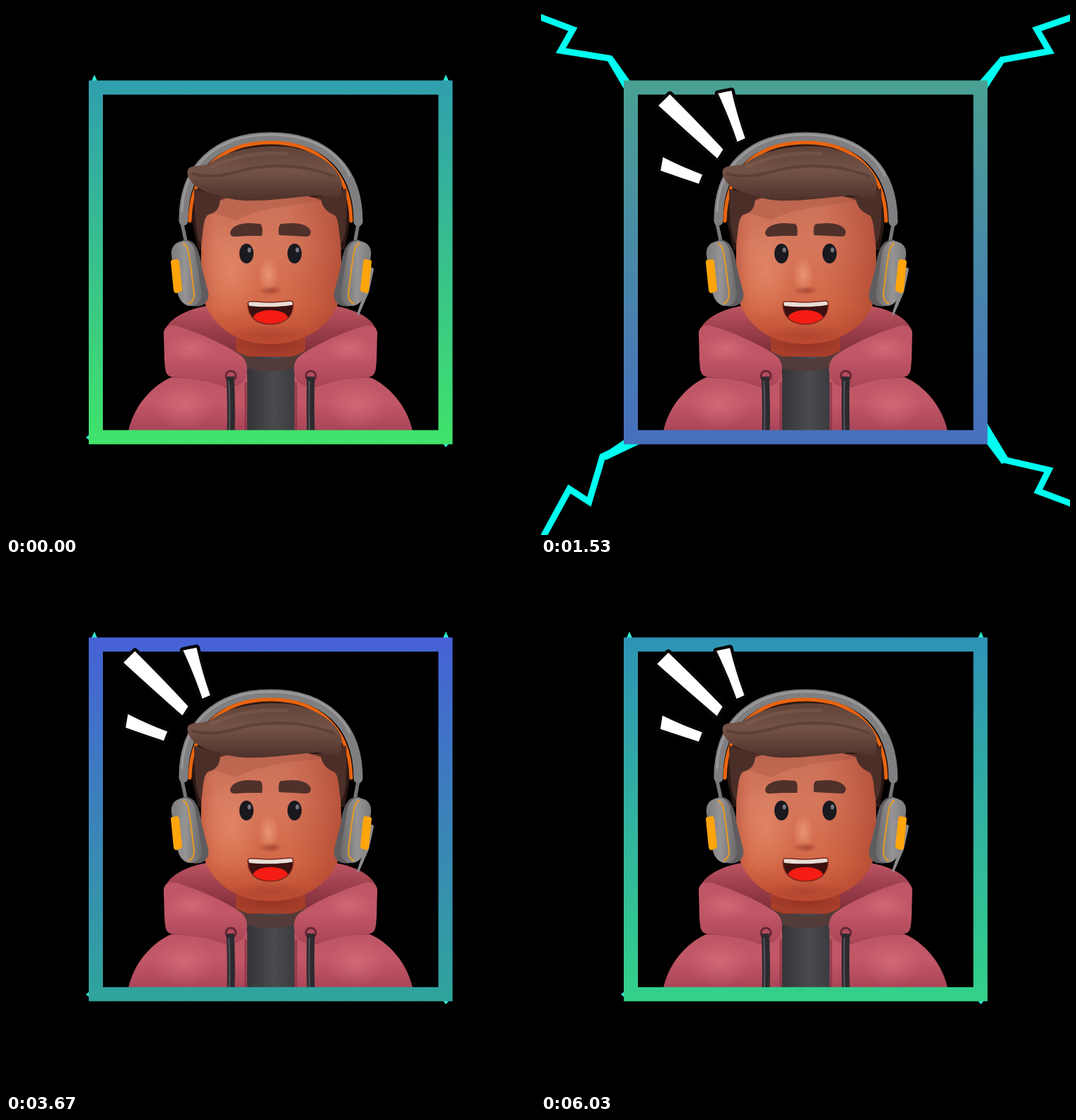
An HTML page that plays this animation: 748 px wide and 748 px high, repeating every 6.06 s.

```html
<!DOCTYPE html>
<html lang="en">
<head>
<meta charset="utf-8">
<title>Headphones portrait</title>
<style>
html, body { margin: 0; width: 100%; height: 100%; overflow: hidden; background: #000; }
svg { display: block; width: 100vw; height: 100vh; }
</style>
</head>
<body>
<svg viewBox="0 0 748 748">
  <defs>
    <linearGradient id="edge" gradientUnits="userSpaceOnUse" x1="0" y1="106" x2="0" y2="620">
      <stop id="top"/><stop id="bottom" offset="1"/>
    </linearGradient>
    <linearGradient id="skin" x2="0" y2="1">
      <stop stop-color="#c97058"/><stop offset=".35" stop-color="#d5775b"/>
      <stop offset=".75" stop-color="#d36847"/><stop offset="1" stop-color="#bd4a30"/>
    </linearGradient>
    <linearGradient id="side">
      <stop stop-color="#a5402b" stop-opacity=".35"/><stop offset=".1" stop-color="#b84a30" stop-opacity="0"/>
      <stop offset=".6" stop-color="#b84a30" stop-opacity="0"/><stop offset="1" stop-color="#a03a26" stop-opacity=".6"/>
    </linearGradient>
    <linearGradient id="hair" x2="0" y2="1">
      <stop stop-color="#5f4238"/><stop offset=".45" stop-color="#745347"/><stop offset="1" stop-color="#4d3129"/>
    </linearGradient>
    <linearGradient id="cloth" x2="0" y2="1">
      <stop stop-color="#bd5665"/><stop offset=".5" stop-color="#c25767"/><stop offset="1" stop-color="#a94558"/>
    </linearGradient>
    <linearGradient id="inside" x2="0" y2="1">
      <stop stop-color="#bd5663"/><stop offset=".4" stop-color="#9c3e4b"/><stop offset="1" stop-color="#6d2632"/>
    </linearGradient>
    <linearGradient id="shirt">
      <stop stop-color="#2c2c30"/><stop offset=".55" stop-color="#4b4b4f"/><stop offset="1" stop-color="#333337"/>
    </linearGradient>
    <linearGradient id="metal">
      <stop stop-color="#7d7a7b"/><stop offset=".45" stop-color="#979496"/><stop offset="1" stop-color="#6b686a"/>
    </linearGradient>
    <radialGradient id="glow">
      <stop stop-color="#f0a07c" stop-opacity=".75"/><stop offset="1" stop-color="#f0a07c" stop-opacity="0"/>
    </radialGradient>
    <radialGradient id="shade">
      <stop stop-color="#8c2f24" stop-opacity=".7"/><stop offset="1" stop-color="#8c2f24" stop-opacity="0"/>
    </radialGradient>
    <radialGradient id="pink">
      <stop stop-color="#da7380" stop-opacity=".6"/><stop offset="1" stop-color="#da7380" stop-opacity="0"/>
    </radialGradient>
    <path id="face" d="M277 300C278 252 471 252 472 300L475 392C474 444 430 478 374 478C318 478 279 444 275 392Z"/>
    <path id="lips" d="M342 421C343 415 350 419 374 419C398 419 405 414 406 420C407 440 393 450 374 450C354 450 342 440 342 421Z"/>
    <clipPath id="mouth"><use href="#lips"/></clipPath>
  </defs>

  <g id="bolts" fill="none" stroke="#00fff0" stroke-miterlimit="8">
    <path pathLength="100" d="M131 132L97 74L28 63L45 33L-8 13"/>
    <path pathLength="100" d="M616 130L652 76L719 64L701 33L756 14"/>
    <path pathLength="100" d="M616 582L656 642L718 656L703 686L756 706"/>
    <path pathLength="100" d="M148 608L87 637L68 701L40 683L0 756"/>
  </g>
  <path id="roots" fill="#00fff0" d="M93 70L101 71L141 127L134 142ZM648 74L657 76L614 143L603 126ZM660 638L652 648L607 588L620 572ZM84 636L92 642L159 610L146 594Z"/>
  <path id="tips" fill="#2ce9d5" d="M120 108L125 97L130 108ZM617 108L622 97L627 108ZM617 618L622 624L627 618ZM119 605L113 610L119 615Z"/>
  <rect id="back" x="136" y="125" width="476" height="476"/>

  <g id="person">
    <!-- hood lining, neck and shirt -->
    <path fill="url(#inside)" d="M223 465C225 444 254 428 290 423H458C496 428 523 443 525 465L430 510H322Z"/>
    <path fill="#a63e2a" d="M325 455H423V495C400 506 348 506 325 495Z"/>
    <ellipse cx="374" cy="478" rx="52" ry="14" fill="url(#shade)"/>
    <path fill="url(#shirt)" d="M326 496H424L412 602H335Z"/>
    <path fill="#533b39" d="M322 486C345 504 402 504 425 486L421 502C405 521 345 521 328 503Z"/>

    <!-- jacket -->
    <path fill="url(#cloth)" d="M173 601C182 560 214 530 242 522L300 526L341 520V601Z"/>
    <path fill="url(#cloth)" d="M575 601C566 560 534 530 506 522L448 526L408 520V601Z"/>
    <ellipse cx="252" cy="565" rx="44" ry="34" fill="url(#pink)"/>
    <ellipse cx="496" cy="565" rx="44" ry="34" fill="url(#pink)"/>
    <g fill="none" stroke="#7d3040" stroke-opacity=".65" stroke-width="3">
      <path d="M234 524C265 524 292 530 312 538M514 524C484 524 456 530 437 538M339 532V600M410 532V600"/>
    </g>
    <path fill="url(#cloth)" d="M223 462C224 452 234 449 246 454C275 463 313 480 333 495C344 504 343 524 333 533C322 542 306 538 292 533C270 526 250 526 233 524C224 522 225 510 224 500Z"/>
    <path fill="url(#cloth)" d="M525 462C524 452 514 449 502 454C473 463 435 480 415 495C404 504 405 524 415 533C426 542 442 538 456 533C478 526 498 526 515 524C524 522 523 510 524 500Z"/>
    <ellipse cx="262" cy="484" rx="36" ry="20" fill="url(#pink)"/>
    <ellipse cx="486" cy="484" rx="36" ry="20" fill="url(#pink)"/>
    <g fill="none" stroke="#662735" stroke-width="3"><circle cx="318" cy="523" r="7"/><circle cx="431" cy="523" r="7"/></g>
    <g fill="none">
      <path stroke="#2b2a2e" stroke-width="11" d="M317 524Q319 560 318 601M431 524Q430 560 431 601"/>
      <path stroke="#55535a" stroke-width="2" d="M315 530Q317 560 316 601M429 530Q428 560 429 601"/>
    </g>

    <!-- headband, behind the fringe -->
    <path fill="#2b1814" d="M262 300C262 230 305 193 374 193C445 193 486 235 487 300L479 345H272Z"/>
    <g fill="none" stroke-linecap="round">
      <path stroke="#777679" stroke-width="5" d="M249 308L255 336M498 308L493 336"/>
      <path stroke="#7f7e80" stroke-width="13" d="M251 304C250 230 296 185 374 185C452 185 498 230 498 305"/>
      <path stroke="#9b999b" stroke-width="3" d="M249 290C251 226 298 182 374 182C430 182 468 204 486 240"/>
      <path stroke="#e9640f" stroke-width="5" d="M260 304C261 238 300 193 374 193C446 193 487 238 488 304"/>
    </g>

    <!-- head -->
    <use href="#face" fill="url(#skin)"/>
    <use href="#face" fill="url(#side)"/>
    <path fill="#a95543" opacity=".4" d="M300 270H447L450 276C400 281 350 288 326 303L290 292Z"/>
    <ellipse cx="318" cy="375" rx="40" ry="70" fill="url(#glow)" opacity=".55"/>
    <ellipse cx="374" cy="464" rx="60" ry="14" fill="url(#shade)" opacity=".5"/>
    <path fill="#4b2e28" d="M266 258L303 270C303 285 298 292 286 295C278 300 279 322 276 336C268 330 266 285 266 258Z"/>
    <path fill="#4b2e28" d="M481 258L445 270C446 286 456 292 465 296C472 304 470 324 474 336C483 325 482 285 481 258Z"/>
    <path fill="url(#hair)" d="M258 230C262 225 276 227 288 223C315 203 358 196 398 199C445 205 474 232 475 252C475 266 472 274 464 272C454 271 448 268 438 268C402 271 356 278 325 274C296 269 270 261 262 248C257 243 255 235 258 230Z"/>
    <path fill="none" stroke="#46302a" stroke-opacity=".45" stroke-width="4" d="M262 237C294 246 317 236 344 230C383 223 424 225 465 241"/>
    <path fill="none" stroke="#8a6857" stroke-opacity=".35" stroke-width="5" d="M290 228C325 211 360 206 398 209"/>

    <!-- features -->
    <g fill="#4f302b">
      <path d="M317 320C319 312 330 307 344 307L359 308Q364 310 362 325L342 325L323 326Q317 326 317 320Z"/>
      <path d="M431 319C429 311 418 307 404 307L389 308Q384 310 386 324L406 325L425 326Q431 326 431 319Z"/>
    </g>
    <g fill="#19191f"><ellipse cx="340" cy="350" rx="10" ry="14"/><ellipse cx="408" cy="350" rx="10" ry="14"/></g>
    <g fill="#777782"><ellipse cx="344" cy="345" rx="2.5" ry="3.5"/><ellipse cx="412" cy="345" rx="2.5" ry="3.5"/></g>
    <ellipse cx="374" cy="402" rx="17" ry="7" fill="url(#shade)"/>
    <ellipse cx="371" cy="380" rx="15" ry="26" fill="url(#glow)"/>
    <g clip-path="url(#mouth)">
      <path fill="#3b100f" d="M335 410H412V455H335Z"/>
      <ellipse cx="374" cy="442" rx="25" ry="12" fill="#f51c13"/>
      <path fill="#e8ded6" d="M340 412H408V422C390 426 360 426 344 424Z"/>
    </g>
    <use href="#lips" fill="none" stroke="#7b291f" stroke-width="1.5"/>

    <!-- ear cups -->
    <path fill="#8c8a8c" d="M514 372Q519 367 520 373L513 405L499 437L496 436L508 400Z"/>
    <g id="cup">
      <path fill="#5f5c5f" d="M250 331C267 329 273 343 277 370L286 405C288 420 277 427 262 424Z"/>
      <path fill="url(#metal)" d="M240 336C252 328 264 333 267 346L277 406C277 418 270 425 259 424C247 422 243 410 240 396L234 353C233 346 235 340 240 336Z"/>
      <path fill="none" stroke="#e99a1c" stroke-width="2" d="M250 336C259 339 258 352 261 367L266 407Q266 418 258 421"/>
      <path fill="#ffa50c" d="M233 362Q233 359 236 359L242 358Q244 358 245 362L249 400Q249 404 246 404L241 406Q238 406 237 402Z"/>
    </g>
    <use href="#cup" transform="matrix(-1 0 0 1 750 0)"/>
  </g>

  <rect id="frame" x="127" y="115.3" width="494.4" height="494.4" fill="none" stroke="url(#edge)" stroke-width="20"/>

  <g id="rays" fill="#fff" stroke="#050505" stroke-width="9" stroke-linejoin="round" paint-order="stroke">
    <path d="M165 142L181 126Q222 166 257 203L249 216Q205 178 165 142Z"/>
    <path d="M249 124L268 120Q276 154 288 187L277 192Q265 157 249 124Z"/>
    <path d="M172 215Q200 229 228 239L223 252Q195 243 169 234Z"/>
  </g>
</svg>
<script>
const LOOP = 6060, BEAT = 1200, TAU = Math.PI * 2;
const $ = id => document.getElementById(id);
// time, then top and bottom colours of the border
const tints = [
  [0, 0x309fae, 0x40e36a], [330, 0x3d8cb4, 0x3bc683], [1530, 0x4aa193, 0x476fbd],
  [2470, 0x45b973, 0x459aa4], [3670, 0x4661d6, 0x2fa59c], [4870, 0x45d56f, 0x4c59cf],
  [6030, 0x2f93b6, 0x33d08a], [LOOP, 0x309fae, 0x40e36a]
];
const ease = (t, a, b) => {
  const k = Math.min(1, Math.max(0, (t - a) / (b - a)));
  return k * k * (3 - 2 * k);
};
const mix = (a, b, k) => 'rgb(' + [16, 8, 0].map(s => {
  const u = a >> s & 255, v = b >> s & 255;
  return Math.round(u + (v - u) * k);
}) + ')';
const pose = (id, scale, turn, x, y) => $(id).setAttribute('transform',
  `translate(${x} ${y}) rotate(${turn}) scale(${scale}) translate(${-x} ${-y})`);
const show = (id, on) => $(id).style.display = on ? '' : 'none';

function draw(t) {
  const i = tints.findIndex(c => c[0] > t), a = tints[i - 1], b = tints[i];
  const k = (t - a[0]) / (b[0] - a[0]);
  $('top').setAttribute('stop-color', mix(a[1], b[1], k));
  $('bottom').setAttribute('stop-color', mix(a[2], b[2], k));

  const hit = ease(t, 30, 330) - ease(t, 330, 660);
  pose('frame', 1 + .09 * hit, 1.1 * hit, 374, 362.5);
  pose('person', 1 + .1 * hit, -1.2 * hit, 374, 392);
  $('back').setAttribute('opacity', 1 - hit);

  const size = 1.24 * ease(t, 30, 320) - .24 * ease(t, 340, 640);
  pose('rays', size, .6 * Math.sin(TAU * t / 700) * ease(t, 400, 700), 290, 254);
  show('rays', size > 0);

  const p = t % BEAT, reach = ease(p, 80, 320) - ease(p, 820, 1150);
  $('bolts').setAttribute('stroke-dasharray', `${100 * reach} 200`);
  $('bolts').setAttribute('stroke-width', 9 + 2 * hit);
  show('bolts', reach > .01);
  show('roots', reach > .3);
  show('tips', reach < .15);
}

const start = performance.now();
function tick() {
  draw((performance.now() - start) % LOOP);
  requestAnimationFrame(tick);
}
tick();
</script>
</body>
</html>
```
